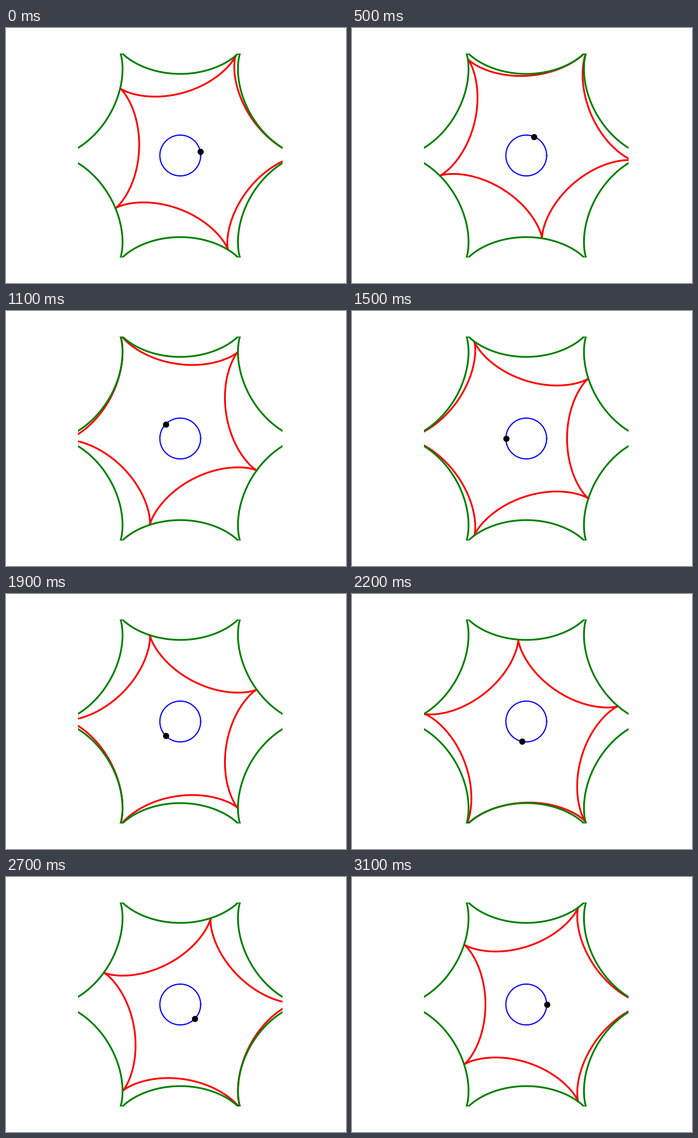
A matplotlib script for the animation above (3.2 s loop, 600 px wide and 450 px high).

```python
import numpy as np
import matplotlib.pyplot as plt
from matplotlib.animation import FuncAnimation

FRAMES = 32
INTERVAL = 100


def hypocycloid(cusps, samples=120):
    """Unit-wheel hypocycloid as complex points, with a cusp on the real axis."""
    t = np.linspace(0, 2 * np.pi, cusps * samples + 1)
    k = cusps - 1
    return k * np.exp(1j * t) + np.exp(-1j * k * t)


def draw(ax, points, **style):
    return ax.plot(points.real, points.imag, **style)[0]


fig = plt.figure(figsize=(8, 6), dpi=75, facecolor="white")
ax = fig.add_axes([0.125, 0.1, 0.775, 0.8])
ax.set_aspect("equal")
ax.set_xlim(-5, 5)
ax.set_ylim(-5, 5)
ax.axis("off")

inner = hypocycloid(5)
circle = np.exp(1j * np.linspace(0, 2 * np.pi, 200))

roller = draw(ax, inner, color="red", lw=3)
draw(ax, hypocycloid(6), color="green", lw=3)
draw(ax, circle, color="blue", lw=2)
dot, = ax.plot([1], [0], "o", color="black", ms=10, mew=0.5)


def update(frame):
    angle = 2 * np.pi * (frame + 1) / FRAMES
    center = np.exp(1j * angle)
    # Rolling without slipping turns the inner curve back by a fifth.
    points = center + inner * np.exp(-1j * angle / 5)
    roller.set_data(points.real, points.imag)
    dot.set_data([center.real], [center.imag])
    return roller, dot


anim = FuncAnimation(fig, update, frames=FRAMES, interval=INTERVAL,
                     init_func=lambda: update(0), repeat=True,
                     repeat_delay=0, blit=False)
plt.show()
```
